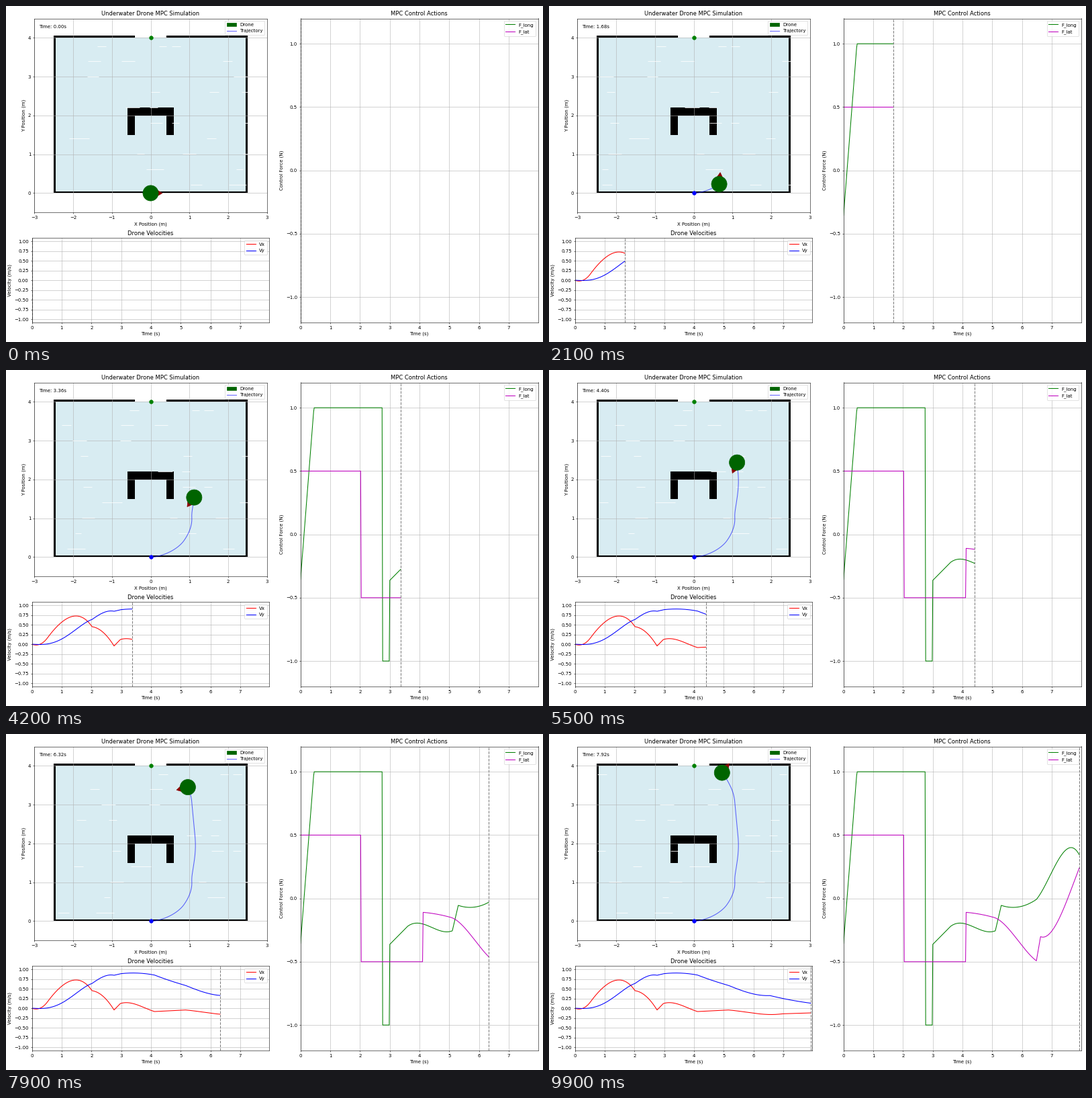
A matplotlib script for the animation above (10000 ms loop, 800 px wide and 500 px high).

```python
import numpy as np
import matplotlib.pyplot as plt
from matplotlib.animation import FuncAnimation
from matplotlib.patches import Circle, Rectangle, RegularPolygon

W, H, DPI = 800, 500, 50
FRAMES, STEP, DT = 100, 4, 0.02
TORQUE_GAIN = 2.1
t = np.round(np.arange(FRAMES * STEP) * DT, 2)


def pieces(*parts):
    """Join polynomials, each through its own few points; one point is a hold."""
    out = np.zeros_like(t)
    for part in parts:
        x, y = np.transpose(part)
        on = t >= x[0]
        s = np.clip(t[on], x[0], x[-1]) - x[0]
        out[on] = np.polyval(np.polyfit(x - x[0], y, len(x) - 1), s)
    return out


def integrate(v):
    return np.concatenate([[0], np.cumsum((v[1:] + v[:-1]) / 2 * DT)])


f_long = pieces(
    [(0, -.355), (.45, 1)],
    [(.46, 1)],
    [(2.76, -1)],
    [(2.99, -.365), (3.6, -.22)],
    [(3.6, -.22), (3.9, -.195), (4.4, -.228), (5.1, -.256)],
    [(5.1, -.256), (5.3, -.055)],
    [(5.3, -.055), (5.7, -.071), (6.48, -.008)],
    [(6.48, -.008), (6.96, .19), (7.6, .4), (7.92, .345)],
)
f_lat = pieces(
    [(0, .5)],
    [(2.04, -.5)],
    [(4.12, -.11), (4.7, -.13), (5.08, -.152)],
    [(5.08, -.152), (5.6, -.255), (6.2, -.43), (6.48, -.493)],
    [(6.48, -.493), (6.62, -.302)],
    [(6.62, -.302), (6.8, -.3), (7.2, -.18), (7.92, .24)],
)
vx = pieces(
    [(0, 0), (.13, -.02), (.3, .01), (.5, .14)],
    [(.5, .14), (.85, .46), (1.25, .685), (1.65, .7), (2.02, .45)],
    [(2.02, .45), (2.32, .35), (2.76, -.045)],
    [(2.76, -.045), (2.97, .12)],
    [(2.97, .12), (3.12, .142), (3.6, .07), (4.12, -.085)],
    [(4.12, -.085), (5.16, -.045)],
    [(5.16, -.045), (5.7, -.095), (6.4, -.157), (6.96, -.143)],
    [(6.96, -.143), (7.92, -.12)],
)
vy = pieces(
    [(0, 0), (.5, .005), (1.04, .15), (1.5, .39), (2.02, .635)],
    [(2.02, .635), (2.32, .78), (2.55, .845), (2.76, .845)],
    [(2.76, .845), (2.98, .885)],
    [(2.98, .885), (3.4, .903), (4.12, .85)],
    [(4.12, .85), (4.4, .77), (5.16, .585)],
    [(5.16, .585), (5.6, .455), (6.1, .35), (6.55, .325)],
    [(6.55, .325), (7.4, .19), (7.92, .13)],
)

# The lateral thruster turns the drone; position follows from velocity
px, py = integrate(vx), integrate(vy)
heading = integrate(integrate(TORQUE_GAIN * f_lat))

# Short streaks in ten rows drift with the current
rng = np.random.default_rng(4)
streak_y = np.tile(np.linspace(.22, 3.79, 10), 3)
streak_x = rng.uniform(0, 5, streak_y.size)
streak_len = rng.uniform(.15, .35, streak_y.size)


def streak_lines(shift):
    x = (streak_x + shift) % 5 - 2.5
    gap = np.full_like(x, np.nan)
    return (np.column_stack([x, x + streak_len, gap]).ravel(),
            np.column_stack([streak_y, streak_y, gap]).ravel())


plt.rcParams.update({"font.family": "DejaVu Sans", "font.size": 10})
fig = plt.figure(figsize=(W / DPI, H / DPI), dpi=DPI)
grid = fig.add_gridspec(3, 2, left=38.6 / W, right=792.6 / W, top=1 - 18.5 / H,
                        bottom=1 - 470.8 / H, wspace=.131, hspace=.303)


def panel(slot, title, xlabel, ylabel, xlim, ylim, xticks, yticks):
    ax = fig.add_subplot(slot)
    ax.set(title=title, xlabel=xlabel, ylabel=ylabel, xlim=xlim, ylim=ylim,
           xticks=xticks, yticks=yticks)
    ax.grid(True)
    return ax


span = (0, t[-1])
ax = panel(grid[:2, 0], "Underwater Drone MPC Simulation", "X Position (m)",
           "Y Position (m)", (-3, 3), (-.5, 4.5), range(-3, 4), range(5))
ax.set_aspect("equal")
ax_v = panel(grid[2, 0], "Drone Velocities", "Time (s)", "Velocity (m/s)",
             span, (-1.08, 1.08), range(8), np.arange(-1, 1.1, .25))
ax_f = panel(grid[:, 1], "MPC Control Actions", "Time (s)", "Control Force (N)",
             span, (-1.2, 1.2), range(8), np.arange(-1, 1.1, .5))


def block(x, y, w, h, color="black"):
    return ax.add_patch(Rectangle((x, y), w, h, color=color, lw=0))


water = block(-2.5, 0, 5, 4, "#d8ecf2")
block(-2.5, 0, 5, .05)
block(-.6, 2, 1.2, .2)
for wall_x, top_x, leg_x in [(-2.5, -2.5, -.6), (2.45, .4, .4)]:
    block(wall_x, 0, .05, 4.05)
    block(top_x, 4, 2.1, .05)
    block(leg_x, 1.5, .2, .5)

streaks, = ax.plot([], [], color="white", lw=1.5, alpha=.8, solid_capstyle="butt")
streaks.set_clip_path(water)
path, = ax.plot([], [], "b-", lw=1.5, alpha=.6, label="Trajectory")
ax.plot(0, 0, "bo", ms=8)
ax.plot(0, 4, "go", ms=8)
nose = ax.add_patch(RegularPolygon((0, 0), 3, radius=.1, color="darkred", zorder=4))
drone = ax.add_patch(Circle((0, 0), .2, color="darkgreen", zorder=5, label="Drone"))
clock = ax.text(.02, .95, "", transform=ax.transAxes)
ax.legend(handles=[drone, path], loc="upper right")

plots = []
for axis, color, label, data in [(ax_v, "r", "Vx", vx), (ax_v, "b", "Vy", vy),
                                 (ax_f, "g", "F_long", f_long), (ax_f, "m", "F_lat", f_lat)]:
    plots.append((axis.plot([], [], color, label=label)[0], data))
cursors = [axis.axvline(0, color="gray", ls="--") for axis in (ax_v, ax_f)]
for axis in (ax_v, ax_f):
    axis.legend(loc="best")


def update(i):
    n = i * STEP
    x, y, a = px[n], py[n], heading[n]
    drone.center = x, y
    nose.xy = x + .2 * np.cos(a), y + .2 * np.sin(a)
    nose.orientation = a - np.pi / 2
    path.set_data(px[:n + 1], py[:n + 1])
    streaks.set_data(*streak_lines(.02 * i))
    clock.set_text(f"Time: {t[n]:.2f}s")
    for line, data in plots:
        line.set_data(t[:n + 1], data[:n + 1])
    for cursor in cursors:
        cursor.set_xdata([t[n], t[n]])
    return []


anim = FuncAnimation(fig, update, frames=FRAMES, interval=100, repeat=True)
plt.show()
```
